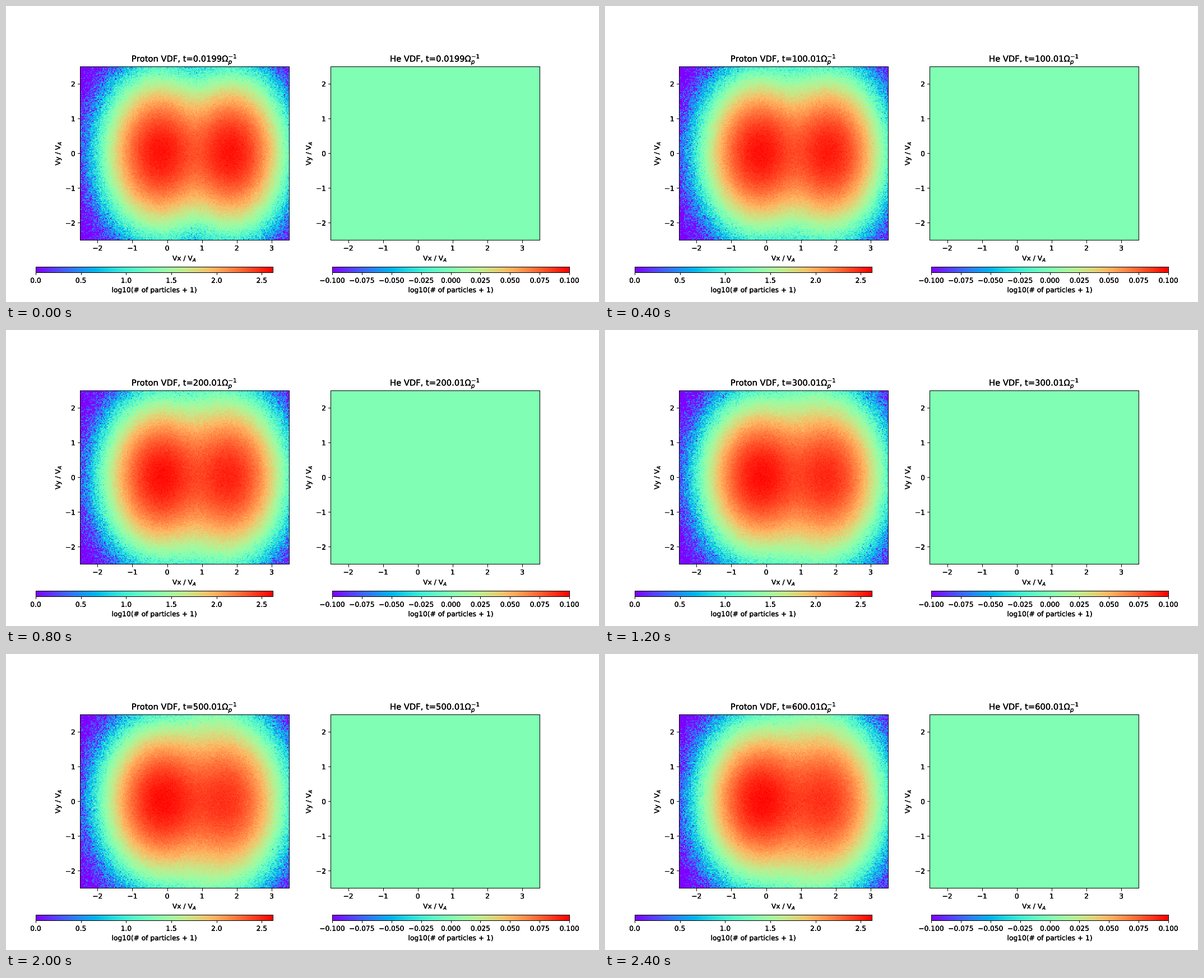
A matplotlib script for the animation above (2.6 s loop, 1058 by 529 pixels).

```python
import numpy as np
import matplotlib.pyplot as plt
from matplotlib.animation import FuncAnimation
from matplotlib.patheffects import Normal

FRAMES = 13
BINS = 200
EXTENT = (-2.5, 3.5, -2.5, 2.5)
LABEL = "log10(# of particles + 1)"
PAD = 3.2

plt.rcParams["font.family"] = "DejaVu Sans"
# Overprinting darkens the soft edges of text and lines.
plt.rcParams["path.effects"] = [Normal(), Normal(), Normal()]


def centres(lo, hi):
    step = (hi - lo) / BINS
    return lo + step * (np.arange(BINS) + 0.5)


VX, VY = np.meshgrid(centres(-2.5, 3.5), centres(-2.5, 2.5))


def maxwellian(peak, drift, sx, sy):
    return peak * np.exp(-((VX - drift) / sx) ** 2 / 2 - (VY / sy) ** 2 / 2)


def proton_vdf(k):
    """Steady core, and a beam that scatters into a hotter halo."""
    p = np.sin(np.pi / 2 * k / (FRAMES - 1))
    core = maxwellian(360 + 8 * p, -0.2 + 0.03 * p, 0.67 + 0.02 * p, 0.93)
    beam = maxwellian(358 - 138 * p, 1.83, 0.66 + 0.02 * p, 0.93 + 0.04 * p)
    halo = maxwellian(75 * p, 1.2, 0.7, 1.35)
    counts = np.random.default_rng(100 + k).poisson(core + beam + halo)
    return np.log10(counts + 1)


def time_text(k):
    early = {0: "0.0199", 1: "50.008", 3: "150.00"}
    return early.get(k, f"{50 * k}.01")


def panel(ax, data, vmin, vmax, bar_left, ticks):
    im = ax.imshow(data, extent=EXTENT, origin="lower", cmap="rainbow",
                   vmin=vmin, vmax=vmax, interpolation="nearest")
    ax.set_xlabel("Vx / V$_A$", labelpad=PAD)
    ax.set_ylabel("Vy / V$_A$", labelpad=PAD)
    ax.set_xticks(range(-2, 4))
    ax.set_yticks(range(-2, 3))
    cax = fig.add_axes([bar_left, 0.1, 0.4, 0.02])
    bar = fig.colorbar(im, cax=cax, orientation="horizontal", ticks=ticks)
    bar.set_label(LABEL, labelpad=PAD)
    return im


fig, (ax_p, ax_he) = plt.subplots(1, 2, figsize=(12, 6), dpi=88.1667)
fig.subplots_adjust(left=0.125, right=0.9, bottom=0.125, top=0.88, wspace=0.2)

proton = panel(ax_p, proton_vdf(0), 0, 2.622, 0.05, np.arange(0, 2.6, 0.5))
panel(ax_he, np.zeros((BINS, BINS)), -0.1, 0.1, 0.55, np.linspace(-0.1, 0.1, 9))


def update(k):
    proton.set_data(proton_vdf(k))
    for ax, name in ((ax_p, "Proton"), (ax_he, "He")):
        title = f"{name} VDF, t={time_text(k)}" + r"$\Omega_p^{-1}$"
        ax.set_title(title, pad=5.2)
    return ()


anim = FuncAnimation(fig, update, frames=FRAMES, interval=200,
                     repeat=True, repeat_delay=0, blit=False)
plt.show()
```
